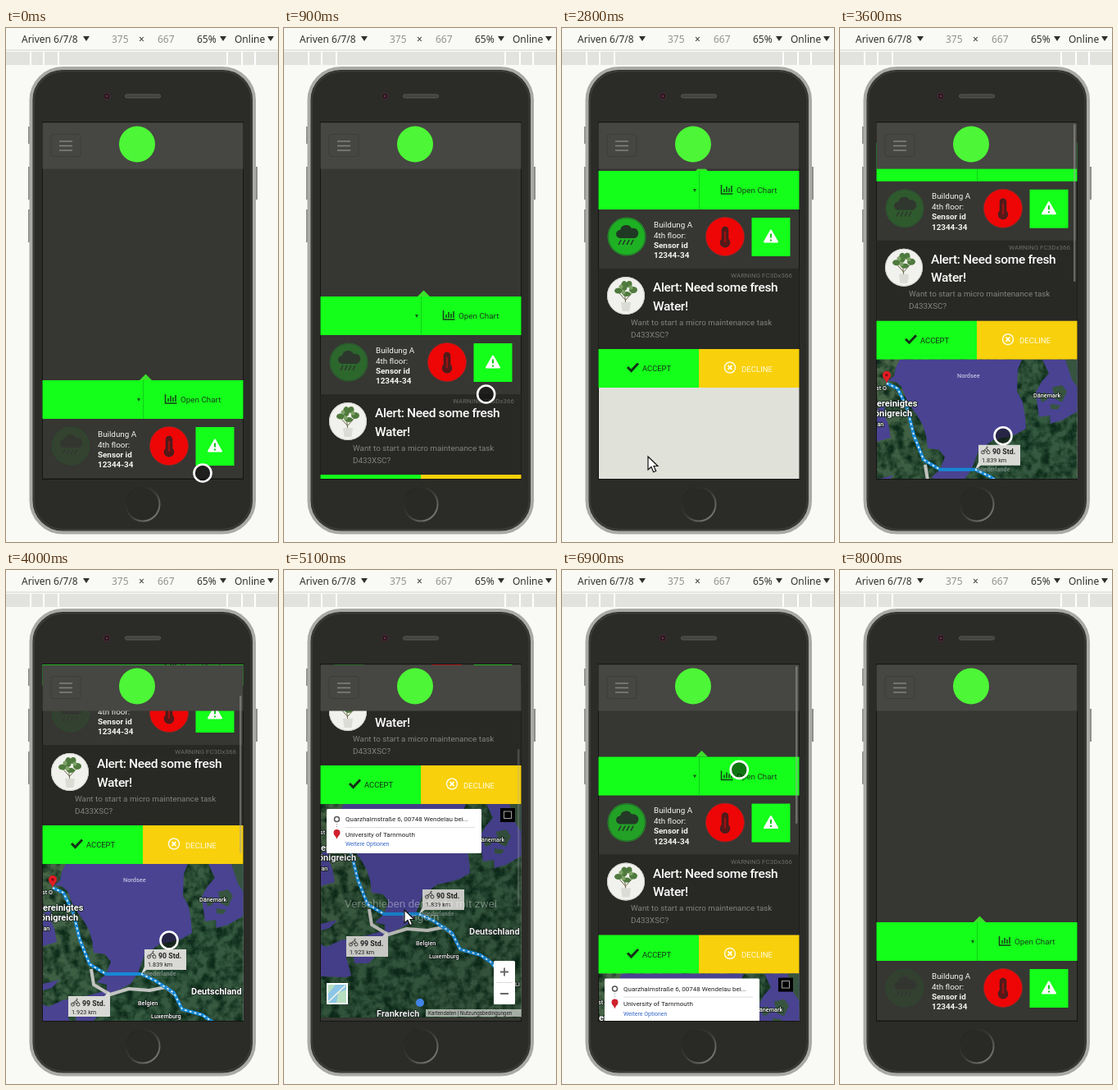
Animation of 332x626 px, one loop 8.3 s. Source, as an HTML page:

```html
<!DOCTYPE html>
<html lang="en">
<head>
<meta charset="utf-8">
<title>Sensor app demo</title>
<style>
  html, body { margin: 0; width: 100%; height: 100%; overflow: hidden; background: #f9faf5; }
  svg { display: block; width: 332px; height: 626px; }
  text { font-family: Roboto, sans-serif; font-size: 9.85px; }
  .tool text { font-family: "Noto Sans", sans-serif; font-size: 12px; fill: #30302d; }
  .tool .dim { fill: #92938e; }
  .title { font-size: 15.5px; font-weight: 500; letter-spacing: -.35px; fill: #fff; }
  .map text { font-size: 7.3px; font-weight: 500; fill: #fff; }
  .map .big { font-size: 11px; font-weight: 700; }
  .names text { paint-order: stroke; stroke: #14201a; stroke-width: 1.6px; }
  .map .dark { fill: #222; font-weight: 400; }
  .map .row { font-size: 8px; }
  .map .std { font-size: 8.8px; font-weight: 700; fill: #222; }
  .map .hint { font-size: 13.5px; font-weight: 400; text-anchor: middle; opacity: .36; }
</style>
</head>
<body>
<svg viewBox="0 0 332 626">
  <defs>
    <clipPath id="screen"><rect x="44.500" y="115" width="245" height="434"/></clipPath>
    <clipPath id="mapBox"><rect width="245" height="260"/></clipPath>
    <clipPath id="pot"><circle cx="78" cy="152" r="23"/></clipPath>
    <linearGradient id="rim" x1="0" y1="0" x2="1" y2="1">
      <stop offset="0" stop-color="#1e1e1b"/><stop offset=".5" stop-color="#3a3a36"/><stop offset="1" stop-color="#8b8b86"/>
    </linearGradient>
    <linearGradient id="land" x1="0" y1="0" x2="1" y2="1">
      <stop offset="0" stop-color="#4a6648"/><stop offset=".55" stop-color="#345a40"/><stop offset="1" stop-color="#3d5a42"/>
    </linearGradient>
    <filter id="forest" x="0" y="0" width="1" height="1" color-interpolation-filters="sRGB">
      <feTurbulence type="fractalNoise" baseFrequency=".09" numOctaves="4" seed="4"/>
      <feColorMatrix values="0 0 0 0 .05  0 0 0 0 .17  0 0 0 0 .1  2.6 0 0 0 -.95"/>
    </filter>
    <path id="pin" d="M0 0C-1-5-5-6-5-10A5 5 0 0 1 5-10C5-6 1-5 0 0Z"/>
    <path id="caret" d="M0 0h8l-4 6z" fill="#30302d"/>
    <g id="bike" fill="none" stroke="#333" stroke-width=".9">
      <circle cx="2.5" cy="7" r="2"/><circle cx="9" cy="7" r="2"/>
      <path d="M2.500 7L4.500 4l3 2.500M4.500 4L7 2l1 2h1.500"/><circle cx="7.600" cy=".8" r=".6"/>
    </g>
  </defs>

  <rect width="332" height="626" fill="#f9faf5"/>
  <g class="tool">
    <text x="19" y="18">Ariven 6/7/8</text><use href="#caret" x="94" y="10"/>
    <text x="129" y="18" class="dim">375</text><text x="162" y="18">×</text><text x="185" y="18" class="dim">667</text>
    <text x="233" y="18">65%</text><use href="#caret" x="261" y="10"/>
    <text x="279" y="18">Online</text><use href="#caret" x="319" y="10"/>
    <path d="M0 27h332" stroke="#d2d3ce"/>
    <path d="M0 37h332" stroke="#e2e3de" stroke-width="16"/>
    <path d="M30 29v16M46 29v16M64 29v16M270 29v16M288 29v16M304 29v16" stroke="#fff" stroke-width="2"/>
  </g>

  <path d="M28.500 120v21M28.500 169v40M28.500 221v40M305.500 169v40" stroke="#8d8e89" stroke-width="3"/>
  <rect x="30.500" y="49" width="272.500" height="565.500" rx="39" fill="#2b2b28" stroke="#a9aaa5" stroke-width="4"/>
  <rect x="34" y="52.500" width="265.500" height="558.500" rx="36" fill="none" stroke="#3b3b37" stroke-width="2"/>
  <circle cx="123" cy="83" r="4" fill="#25191f" stroke="#4a2b38"/><circle cx="123" cy="83" r="1.300" fill="#713049"/>
  <rect x="145.500" y="81" width="43" height="4" rx="2" fill="#41413d" stroke="#5a5a56"/>
  <circle cx="167" cy="580" r="20.500" fill="#292926" stroke="url(#rim)" stroke-width="2"/>
  <rect x="44.500" y="114.500" width="245" height="435" fill="#363632" stroke="#151513"/>

  <g clip-path="url(#screen)">
    <g id="page">
      <path d="M163 0l7.500-7.500L178 0z" fill="#3be02a"/>
      <rect x="44" width="246" height="47" fill="#14ff1a"/>
      <path d="M167.500 0v47" stroke="#10cf17"/>
      <path d="M160 22h4l-2 4z" fill="#145a18"/>
      <path d="M194.500 17v11h14M198 26v-4M201 26v-7M204 26v-5M207 26v-8" fill="none" stroke="#163d18" stroke-width="1.500"/>
      <text x="213" y="27" fill="#193d1b">Open Chart</text>

      <g id="rain">
        <circle cx="79" cy="80" r="23.500" fill="#19d321"/>
        <path d="M71 82a5 5 0 0 1 0-10a7.500 7.500 0 0 1 14-2a5.500 5.500 0 0 1 4 12z" fill="#1c3b22"/>
        <path d="M72 84l-3 6M77 84l-3 6M82 84l-3 6M87 84l-3 6" stroke="#1c3b22" stroke-width="1.600"/>
      </g>
      <circle cx="79" cy="80" r="22.500" fill="none" stroke="#2a4a31" opacity=".7"/>
      <g fill="#f4f4f0">
        <text x="112" y="68.500">Buildung A</text><text x="112" y="81.500">4th floor:</text>
        <g font-weight="700"><text x="112" y="93.500">Sensor id</text><text x="112" y="106">12344-34</text></g>
      </g>
      <circle cx="199" cy="80" r="23.500" fill="#ee0505" stroke="#902e2a" stroke-width=".8"/>
      <path d="M195.500 83v-11a3.500 3.500 0 0 1 7 0v11a5.500 5.500 0 1 1-7 0z" fill="#5a1717" stroke="#3f2020" stroke-width="1.500"/>
      <path d="M199 74v13" stroke="#a01111" stroke-width="2"/>
      <rect x="231.500" y="57" width="47" height="47" fill="#14ff1a"/>
      <path d="M255 72.500l8 14h-16z" fill="#fff" stroke="#fff" stroke-width="2" stroke-linejoin="round"/>
      <path d="M255 76.500v5M255 83.500v2" stroke="#14c61a" stroke-width="2"/>

      <rect x="44" y="119" width="246" height="98" fill="#282825"/>
      <text x="206" y="130" style="font-size:8px" fill="#6c6c68">WARNING FC3Dx366</text>
      <g clip-path="url(#pot)">
        <rect x="54" y="128" width="48" height="48" fill="#f1f1ed"/>
        <path d="M78 164l-2-19M78 158l-8-9M78 157l9-10" fill="none" stroke="#6b6848"/>
        <g fill="#4f7a3d">
          <ellipse cx="76" cy="140" rx="4" ry="6"/><ellipse cx="69" cy="146" rx="5" ry="3.500"/><ellipse cx="87" cy="145" rx="5" ry="4"/>
          <ellipse cx="82" cy="138" rx="3.500" ry="4"/><ellipse cx="79" cy="150" rx="5" ry="3"/>
        </g>
        <g fill="#7ea267"><circle cx="72" cy="141" r="2.500"/><circle cx="84" cy="142" r="2.500"/><circle cx="75" cy="148" r="2.500"/></g>
        <path d="M72 160h12l-1.500 11h-9z" fill="#dcdcd6"/>
      </g>
      <circle cx="78" cy="152" r="22.500" fill="none" stroke="#cfcfca"/>
      <text x="111" y="147" class="title">Alert: Need some fresh</text>
      <text x="111" y="169.500" class="title">Water!</text>
      <g fill="#83837e"><text x="84" y="187.500">Want to start a micro maintenance task</text><text x="84" y="202.500">D433XSC?</text></g>

      <rect x="44" y="217" width="123" height="47" fill="#14ff1a"/>
      <rect x="167" y="217" width="123" height="47" fill="#f8d00b"/>
      <path d="M80 239l4.500 4.500l8.500-9" fill="none" stroke="#153018" stroke-width="3"/>
      <text x="98" y="244" style="font-size:9.400px" fill="#153018">ACCEPT</text>
      <g fill="none" stroke="#fffbe2" stroke-width="1.500"><circle cx="205" cy="239.500" r="6.500"/><path d="M202.500 237l5 5M207.500 237l-5 5" stroke-width="2"/></g>
      <text x="219" y="244.500" style="font-size:9.600px" fill="#fffbe2">DECLINE</text>

      <g class="map" transform="translate(45 264)" clip-path="url(#mapBox)">
        <rect width="245" height="260" fill="#e0e2da"/>
        <g id="map">
          <rect width="245" height="260" fill="url(#land)"/>
          <rect width="245" height="260" filter="url(#forest)"/>
          <g fill="#494392">
            <path d="M28 0L23 10L21 20L14 26L23 27L30 33L38 53L49 68L56 80L60 93L62 108L76 110L83 119L77 134L66 144L78 147L78 154L56 160L24 166L7 174L0 171V210L30 211L37 209L31 186L40 186L41 194L58 194L72 181L80 173L81 158L93 153L107 146L116 133L124 111L142 98L156 95L170 91L182 84L181 70L178 52L171 39L172 12L177 0Z"/>
            <path d="M0 60l10-4l-1 10l5 13l3 16l-17 5zM0 146l20-5l-9 10l-11 3z"/>
            <path d="M202 0L210 17L201 27L194 40L196 56L198 70L211 68L212 78L226 74L245 63V0Z"/>
          </g>
          <path d="M198 42l8-2l2 9l-7 3zM214 34l12-3l6 8l-6 13l-9-4zM212 54l12 2l-4 5l-8-1zM230 0h15v34l-7-10z" fill="#36543f"/>
          <path d="M59 128L62 147L82 159L105 152L130 154L150 150L162 160" fill="none" stroke="#c3c4c1" stroke-width="4" stroke-linejoin="round"/>
          <g fill="none" stroke-linejoin="round">
            <path d="M12 29L25 35L37 59L45 92L57 122L77 134H120L137 142L160 157L170 177L195 184L208 193L225 215" stroke="#1689d6" stroke-width="4"/>
            <path d="M12 29L25 35L37 59L45 92L57 122L77 134M120 134L137 142L160 157L170 177L195 184L208 193L225 215" stroke="#e5f3fb" stroke-width="1.700" stroke-dasharray="2.500 3.500"/>
          </g>
          <g class="names">
            <text x="98" y="22" style="fill:#c2bfe0;stroke:none">Nordsee</text>
            <text x="191" y="46">Dänemark</text>
            <text x="-7" y="57" class="big">Vereinigtes</text><text x="-10" y="69" class="big">Königreich</text>
            <text x="-6" y="81">Man</text><text x="-1" y="37">st O</text>
            <text x="123" y="136" style="fill:#82938a;stroke:none">Niederlande</text>
            <text x="181" y="159" class="big">Deutschland</text>
            <text x="116" y="172">Belgien</text><text x="132" y="188">Luxemburg</text>
            <text x="68" y="259" class="big">Frankreich</text><text x="237" y="222">Li</text>
          </g>
          <use href="#pin" x="12" y="29" fill="#e51b23"/><circle cx="12" cy="19" r="1.700" fill="#7d0c12"/>
          <g fill="#d9dad6">
            <path d="M124 104h51v25h-48l-7 5l4-9z"/><path d="M31 161h44l6-6l1 6v25h-51z"/>
          </g>
          <use href="#bike" x="127" y="106"/><text x="141" y="115" class="std">90 Std.</text><text x="128" y="125" class="dark">1.839 km</text>
          <use href="#bike" x="34" y="164"/><text x="48" y="173" class="std">99 Std.</text><text x="35" y="182.500" class="dark">1.923 km</text>
        </g>
        <g id="hint">
          <rect width="245" height="260" opacity=".08"/>
          <text x="122" y="126" class="hint">Verschieben der Karte mit zwei</text><text x="122" y="142" class="hint">Fingern</text>
        </g>
        <g id="panel">
          <rect x="7" y="6" width="189" height="54" rx="1.500" fill="#fff"/>
          <circle cx="19.500" cy="18.500" r="3" fill="none" stroke="#555" stroke-width="1.500"/>
          <path d="M19.500 24v6" stroke="#888" stroke-dasharray="1 2"/><path d="M30 28.500h158" stroke="#ddd"/>
          <use href="#pin" transform="translate(19.500 43) scale(.8)" fill="#cf1f2b"/>
          <text x="30" y="21" class="dark row">Quarzhalmstraße 6, 00748 Wendelau bei...</text>
          <text x="30" y="39.500" class="dark row">University of Tarnmouth</text>
          <text x="30" y="51" style="font-size:7px;font-weight:400;fill:#3467c8">Weitere Optionen</text>
          <rect x="219" y="5" width="18" height="17"/><rect x="223.500" y="9" width="9" height="8.500" fill="none" stroke="#b5b5b5" stroke-width=".9"/>
          <rect x="211" y="191" width="26" height="53" rx="1.500" fill="#fff"/>
          <path d="M214 217.500h20" stroke="#ddd"/><path d="M219 204.500h10M224 199.500v10M219 231h10" stroke="#666" stroke-width="1.800"/>
          <rect x="8" y="219" width="24" height="24" fill="#b8dfc1" stroke="#fff" stroke-width="2"/>
          <path d="M9 231l9-11h13v6l-10 4l-2 12h-10z" fill="#8bc6e6"/><path d="M9 241l21-20" stroke="#f5f5e8" stroke-width="1.500"/>
          <circle cx="121" cy="242" r="5" fill="#4285e8"/>
          <rect x="128" y="250" width="117" height="9" fill="#cfd2cd" opacity=".75"/>
          <text x="131" y="257" class="dark" style="font-size:6.300px">Kartendaten | Nutzungsbedingungen</text>
        </g>
      </g>
    </g>
    <rect x="44" y="115.600" width="246" height="56" fill="#464642"/>
    <rect x="55" y="129.500" width="36" height="27" rx="3" fill="none" stroke="#3c3c38"/>
    <path d="M65 138h16M65 143.500h16M65 149h16" stroke="#83837f" stroke-width="1.600"/>
    <circle cx="160" cy="141.500" r="22" fill="#4df637"/>
    <rect id="thumb" x="285" width="2.500" height="192" rx="1.200" fill="#a2a39f"/>
  </g>

  <g id="cursor">
    <circle id="ring" r="10.500" fill="#101010" fill-opacity=".58" stroke="#fff" stroke-width="2.600"/>
    <path id="arrow" d="M0 0V16l4-3.500l2.700 6.300l3-1.300l-2.700-6H12z" fill="#fff" stroke="#111" stroke-width="1.200"/>
  </g>
</svg>
<script>
  const LOOP = 8300, STEP = 100;
  const $ = id => document.getElementById(id);

  // Rows are [time, value, ...].
  const scroll = [[300, 429], [1100, 293], [1200, 285], [2200, 285], [2700, 174], [3300, 174],
    [4000, 94], [4300, 21], [6200, 21], [6600, 170], [6700, 170], [7600, 429]];
  const path = [[300, 240, 542], [1200, 250, 398], [2100, 105, 524], [2300, 105, 524], [2400, 105, 522],
    [3000, 105, 522], [3300, 199, 531], [4000, 199, 451], [4300, 199, 378], [4400, 199, 378],
    [5100, 147, 414], [5500, 147, 414], [6200, 205, 289], [6600, 205, 439], [6700, 205, 439],
    [6800, 215, 211], [7600, 225, 470], [7900, 244, 59]];
  const bar = [[3100, 0], [3200, .5], [4700, .5], [5400, .12], [6200, .12], [6300, .5], [7500, .5], [7600, 0]];
  const hint = [[4700, 0], [5000, 1], [6300, 1], [6600, 0]];
  const modes = [[0, 'ring'], [2400, 'arrow'], [3200, 'ring'], [4500, 'arrow'], [6000, 'ring'], [8000, 'none']];

  function at(rows, t) {
    const i = rows.findIndex(r => r[0] > t);
    if (i === 0) return rows[0].slice(1);
    if (i < 0) return rows[rows.length - 1].slice(1);
    const a = rows[i - 1], b = rows[i], k = (t - a[0]) / (b[0] - a[0]);
    return a.slice(1).map((v, j) => v + (b[j + 1] - v) * k);
  }
  const show = (id, on) => { $(id).style.display = on ? '' : 'none'; };

  function draw(t) {
    const [top] = at(scroll, t), [x, y] = at(path, t);
    const mode = modes.filter(m => m[0] <= t).pop()[1];
    $('page').setAttribute('transform', `translate(0 ${top})`);
    $('cursor').setAttribute('transform', `translate(${x} ${y})`);
    for (const id of ['ring', 'arrow']) show(id, id === mode);
    $('rain').style.opacity = .06 + .47 * (1 - Math.cos((t - 200) / 3950 * 2 * Math.PI));
    $('thumb').setAttribute('y', Math.max(117, 153 + (94 - top) * .89));
    $('thumb').style.opacity = at(bar, t)[0];
    $('hint').style.opacity = at(hint, t)[0];
    show('map', t >= 3400);
    show('panel', t >= 4200);
  }

  const start = performance.now();
  function tick() {
    const t = (performance.now() - start) % LOOP;
    draw(Math.min(8000, Math.floor(t / STEP) * STEP));
    requestAnimationFrame(tick);
  }
  tick();
</script>
</body>
</html>
```
